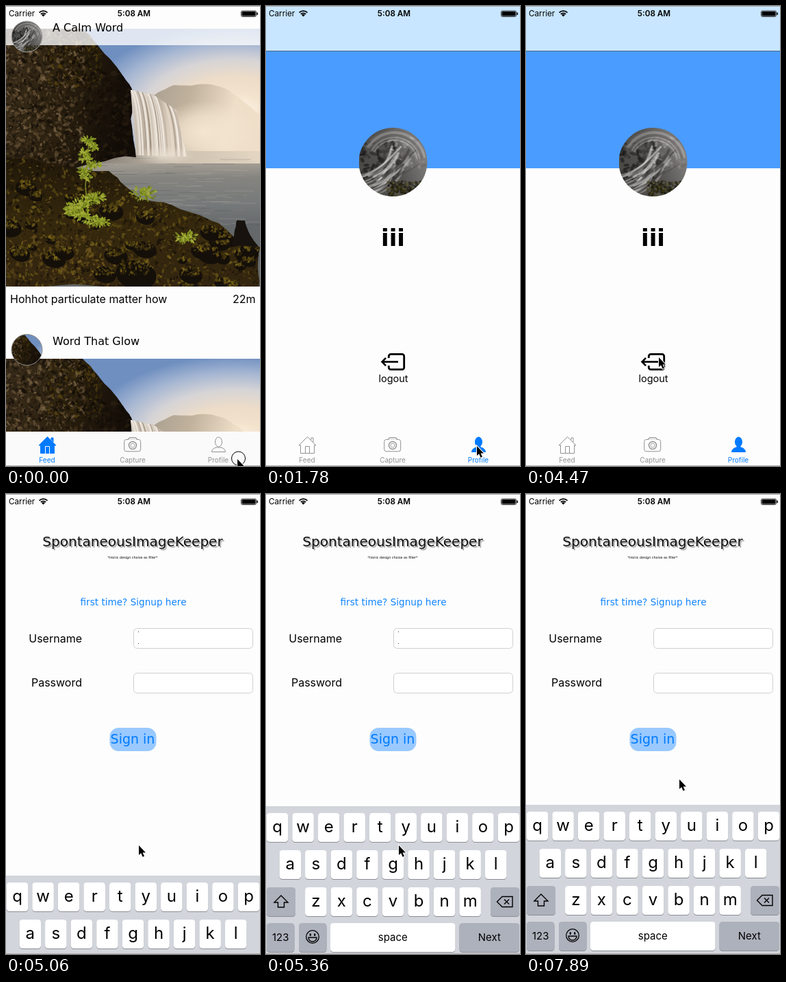
These frames come from a looping animation (371x669 px, 8000 ms). An HTML page with a canvas:

```html
<!DOCTYPE html>
<html lang="en">
<head>
<meta charset="utf-8">
<title>Photo feed</title>
<style>
html, body { margin: 0; width: 100%; height: 100%; overflow: hidden; background: #fdfdfd; }
canvas { display: block; width: 371px; height: 669px; }
</style>
</head>
<body>
<canvas id="stage"></canvas>
<script>
const W = 371, H = 669, LOOP = 8000, STEP = 148.9;
const SANS = 'Inter, "Open Sans", sans-serif';
const HAND = '"DejaVu Sans", cursive';
const BLUE = '#007aff', GREY = '#929292', PAPER = '#fdfdfd';
const ratio = window.devicePixelRatio || 1;

function makeContext(el, w, h) {
  el.width = Math.round(w * ratio);
  el.height = Math.round(h * ratio);
  const c = el.getContext('2d');
  c.scale(ratio, ratio);
  return c;
}
const g = makeContext(document.getElementById('stage'), W, H);

// ---- helpers ----
function rect(c, x, y, w, h, fill) {
  c.fillStyle = fill;
  c.fillRect(x, y, w, h);
}
function roundRect(x, y, w, h, r, fill, edge) {
  g.beginPath();
  g.roundRect(x, y, w, h, r);
  paint(fill, edge);
}
function paint(fill, edge, width = 1) {
  if (fill) {
    g.fillStyle = fill;
    g.fill();
  }
  if (edge) {
    g.strokeStyle = edge;
    g.lineWidth = width;
    g.stroke();
  }
}
function trace(c, pts) {
  c.beginPath();
  pts.forEach(([x, y]) => c.lineTo(x, y));
}
function line(pts, color, width) {
  trace(g, pts);
  paint(null, color, width);
}
function dot(c, x, y, rx, ry, turn, fill) {
  c.beginPath();
  c.ellipse(x, y, rx, ry, turn, 0, 7);
  c.fillStyle = fill;
  c.fill();
}
function ring(x, y, r, color, width) {
  g.beginPath();
  g.arc(x, y, r, 0, 7);
  paint(null, color, width);
}
function gradient(c, x0, y0, x1, y1, ...colors) {
  const grad = c.createLinearGradient(x0, y0, x1, y1);
  colors.forEach((col, i) => grad.addColorStop(i / (colors.length - 1), col));
  return grad;
}
function text(s, x, y, size, { color = '#000', align = 'left', weight = 400, font = SANS } = {}) {
  g.font = `${weight} ${size}px ${font}`;
  g.textAlign = align;
  g.fillStyle = color;
  g.fillText(s, x, y);
}
function hand(s, x, y, size, color = '#000', align = 'left') {
  text(s, x, y, size, { color, align, font: HAND });
}

// ---- pictures, painted once ----
let seed = 7;
const rnd = (a = 0, b = 1) => a + (b - a) * ((seed = (seed * 16807) % 2147483647) / 2147483647);
const pick = list => list[Math.floor(rnd(0, list.length))];

// Rough outline through a few key points.
function ragged(pts, depth = 3) {
  if (!depth) return pts;
  const out = [];
  pts.forEach(([x, y], i) => {
    out.push([x, y]);
    const next = pts[i + 1];
    if (!next) return;
    const d = Math.hypot(next[0] - x, next[1] - y) * 0.07;
    out.push([(x + next[0]) / 2 + rnd(-d, d), (y + next[1]) / 2 + rnd(-d, d)]);
  });
  return ragged(out, depth - 1);
}
function shape(c, pts, fill) {
  trace(c, pts);
  c.fillStyle = fill;
  c.fill();
}
function speckle(c, x, y, w, h, count, size, colors) {
  for (let i = 0; i < count; i++) {
    c.globalAlpha = rnd(0.35, 0.8);
    const r = size * rnd(0.4, 1.3);
    dot(c, x + rnd(0, w), y + rnd(0, h), r, r * rnd(0.3, 0.7), rnd(0, 3), pick(colors));
  }
  c.globalAlpha = 1;
}
function clipped(c, pts, body) {
  c.save();
  trace(c, pts);
  c.clip();
  body();
  c.restore();
}
function glow(c, x, y, rx, ry, ...colors) {
  c.save();
  c.translate(x, y);
  c.scale(1, ry / rx);
  const grad = c.createRadialGradient(0, 0, 0, 0, 0, rx);
  colors.forEach((col, i) => grad.addColorStop(i / (colors.length - 1), col));
  rect(c, -W, -W * 2, W * 2, W * 4, grad);
  c.restore();
}
function boulder(c, x, y, r) {
  dot(c, x, y, r, r * 0.7, 0.2, '#150f09');
  speckle(c, x - r * 0.8, y - r * 0.7, r * 1.5, r * 0.7, r * 3, 2.4, ['#6c5813', '#4f4010', '#84701d', '#2d220d']);
}
function plant(c, x, y, r) {
  for (let i = 0; i < r * 4; i++) {
    const a = rnd(0, 6.3), d = rnd(0, r);
    dot(c, x + Math.cos(a) * d, y + Math.sin(a) * d * 0.6, 2.6, 1.1, a, pick(['#8c9a25', '#6d7d1c', '#a4ab3a']));
  }
}
function paintLandscape() {
  const el = document.createElement('canvas');
  const c = makeContext(el, W, 375);

  glow(c, 335, 118, 225, 122, '#fff6e8', '#f3e3cd', '#ecdcc8', '#d6d4d6', '#a5b6d2', '#6f8fc0');
  shape(c, ragged([[195, 105], [245, 82], [318, 86], [371, 125], [371, 190], [195, 190]]),
    gradient(c, 200, 90, 330, 125, '#a69d90', '#c0b19c', '#efdfc9'));
  glow(c, 290, 150, 75, 45, '#f3e5d0', 'rgba(243,229,208,.7)', 'rgba(243,229,208,0)');

  rect(c, 0, 180, W, 195, gradient(c, 0, 180, 0, 290, '#bbb1a4', '#85847f', '#777a7a', '#64686a'));
  rect(c, 0, 178, W, 18, gradient(c, 120, 0, W, 0, '#77736c', '#cbbfae', '#e4d6c2'));
  for (let i = 0; i < 110; i++) {
    rect(c, rnd(80, 340), rnd(186, 285), rnd(10, 50), 1, pick(['rgba(190,184,174,.25)', 'rgba(50,55,60,.2)']));
  }

  const cliff = ragged([[-5, -5], [108, -5], [150, 42], [184, 88], [190, 187], [60, 210], [-5, 210]]);
  shape(c, cliff, gradient(c, 0, 0, 190, 40, '#382b1a', '#2c210f', '#120c07'));
  clipped(c, cliff, () => {
    speckle(c, 0, 0, 115, 205, 1500, 3.2, ['#5f4c30', '#110c07', '#231a0f', '#46361f', '#1a130b', '#80694a']);
    speckle(c, 60, 0, 80, 85, 450, 3, ['#5a4610', '#1b1308', '#372a0c', '#120d07']);
    speckle(c, 110, 60, 80, 130, 350, 4, ['#0e0a06', '#20170d', '#2d2213', '#140f08']);
  });

  const falls = [[182, 89], [215, 96], [248, 118], [264, 186], [190, 184]];
  shape(c, falls, gradient(c, 184, 0, 262, 0, '#d4cbc0', '#a3937f', '#d9ccbb', '#eadfcf'));
  clipped(c, falls, () => {
    for (let i = 0; i < 55; i++) {
      const u = rnd(), x = 180 + u * 68;
      c.beginPath();
      c.moveTo(x, 88 + u * u * 30);
      c.quadraticCurveTo(x + 12, 105 + u * 30, x + 14, 188);
      c.strokeStyle = pick(['rgba(250,244,236,.6)', 'rgba(240,232,222,.5)', 'rgba(120,104,86,.35)']);
      c.lineWidth = rnd(1, 3);
      c.stroke();
    }
  });
  glow(c, 232, 184, 45, 14, 'rgba(232,222,208,.9)', 'rgba(232,222,208,0)');

  const ground = ragged([[-5, 185], [90, 204], [150, 207], [190, 243], [285, 272], [371, 318], [371, 380], [-5, 380]]);
  shape(c, ground, gradient(c, 0, 190, 0, 375, '#211809', '#35280d', '#33250f'));
  clipped(c, ground, () => {
    speckle(c, 0, 185, W, 190, 2300, 3, ['#665314', '#130d07', '#7a651d', '#2b200c', '#473710', '#1a1209']);
    speckle(c, 0, 300, 170, 75, 350, 3, ['#7a5d20', '#5c471a', '#3a2b12']);
    for (let i = 0; i < 42; i++) {
      const x = rnd(0, W);
      boulder(c, x, 215 + x * 0.27 + rnd(0, 150 - x * 0.2), rnd(6, 19));
    }
  });
  boulder(c, 190, 358, 30);
  shape(c, ragged([[331, 315], [337, 279], [349, 279], [369, 317]]), '#17120e');

  c.strokeStyle = '#7c872a';
  c.lineWidth = 1.5;
  trace(c, [[122, 290], [116, 230], [121, 165]]);
  c.stroke();
  for (let i = 0; i < 7; i++) plant(c, 120 + Math.sin(i * 2) * 9, 162 + i * 9, 10);
  for (let i = 0; i < 8; i++) plant(c, 95 + i * 6, 262 + Math.sin(i * 3) * 22, 15);
  plant(c, 200, 240, 19);
  plant(c, 263, 303, 17);
  return el;
}
function paintFalls() {
  const el = document.createElement('canvas');
  const c = makeContext(el, 100, 100);
  rect(c, 0, 0, 100, 100, gradient(c, 0, 60, 100, 20, '#4a4946', '#555452', '#8b8987'));
  speckle(c, 0, 20, 60, 55, 130, 5, ['#1c1b1a', '#343331', '#504f4d']);
  speckle(c, 45, 15, 50, 45, 60, 5, ['#a3a19f', '#6f6d6b', '#858381']);
  c.lineCap = 'round';
  for (let i = 0; i < 24; i++) {
    const y = rnd(70, 100), x = rnd(0, 35);
    c.beginPath();
    c.moveTo(x, y);
    c.quadraticCurveTo(x + 25, y - 8, x + rnd(30, 60), y - rnd(25, 45));
    c.strokeStyle = pick(['rgba(235,234,232,.55)', 'rgba(190,188,186,.5)', 'rgba(60,59,57,.6)']);
    c.lineWidth = rnd(1, 4);
    c.stroke();
  }
  for (let i = 0; i < 8; i++) {
    c.beginPath();
    c.arc(52, 52, 34 + i * 2, -2.6, -0.2);
    c.strokeStyle = pick(['rgba(215,213,211,.35)', 'rgba(110,108,106,.4)']);
    c.lineWidth = 2;
    c.stroke();
  }
  speckle(c, 42, 78, 50, 22, 230, 2.5, ['#5f5716', '#141209', '#2a260f', '#1c1a10']);
  return el;
}
const landscape = paintLandscape();
const falls = paintFalls();

function avatar(img, x, y, r, sx, sy, size, border) {
  g.save();
  g.beginPath();
  g.arc(x, y, r, 0, 7);
  g.clip();
  g.drawImage(img, sx * ratio, sy * ratio, size * ratio, size * ratio, x - r, y - r, r * 2, r * 2);
  g.restore();
  if (border) ring(x, y, r, border, 1);
}

// ---- shared chrome ----
function statusBar() {
  text('Carrier', 4, 15, 11.7);
  text('5:08 AM', 187, 15, 11.7, { align: 'center', weight: 600 });
  for (let i = 0; i < 3; i++) {
    g.beginPath();
    g.arc(54.5, 15.5, 2 + i * 3.2, -Math.PI * 0.75, -Math.PI * 0.25);
    paint(null, '#000', i ? 1.7 : 3);
  }
  roundRect(343.5, 7, 22, 8.5, 2, null, '#333');
  roundRect(344.5, 8, 20, 6.5, 1, '#000');
  rect(g, 366.5, 9.5, 1.5, 3.5, '#000');
}
function house(on) {
  const fill = on ? BLUE : null, color = on ? BLUE : GREY;
  trace(g, [[66, 631], [66, 628], [69, 628], [69, 634]]);
  paint(fill, color);
  trace(g, [[48, 639], [60.5, 626.5], [73, 639]]);
  g.closePath();
  paint(on ? BLUE : '#fff', color);
  g.beginPath();
  g.rect(50.5, 639, 20, 11.5);
  paint(on ? BLUE : '#fff', color);
  if (!on) rect(g, 51, 638, 19, 2, '#fff');
  line([[57.5, 651], [57.5, 640.5], [63.5, 640.5], [63.5, 651]], on ? '#fff' : color, 1);
}
function camera() {
  roundRect(172.7, 630.5, 24, 17.3, 3, null, GREY);
  trace(g, [[178, 630.7], [180.5, 627.8], [189.5, 627.8], [192, 630.7]]);
  paint('#fafafa', GREY, 1.2);
  ring(185, 639, 5.5, GREY, 1.4);
  ring(185, 639, 3, GREY, 0.8);
}
function person(on) {
  const fill = on ? BLUE : '#fafafa', edge = on ? BLUE : GREY;
  g.beginPath();
  g.moveTo(300.5, 648.5);
  g.quadraticCurveTo(301, 643.5, 307, 642);
  g.lineTo(314, 642);
  g.quadraticCurveTo(320, 643.5, 320.5, 648.5);
  g.closePath();
  paint(fill, edge);
  if (on) rect(g, 307.5, 636, 6, 8, BLUE);
  g.beginPath();
  g.ellipse(310.5, 634, 5, 7, 0, 0, 7);
  paint(fill, edge);
}
function tabBar(active) {
  rect(g, 0, 619, W, 50, active ? PAPER : '#fafafa');
  house(active === 0);
  camera();
  person(active === 2);
  ['Feed', 'Capture', 'Profile'].forEach((s, i) =>
    text(s, 60 + i * 125, 664, 10, { align: 'center', color: i === active ? BLUE : GREY }));
}

// ---- screens ----
function feed() {
  g.drawImage(landscape, 0, 33, W, 375);
  g.drawImage(landscape, 0, 513, W, 375);
  rect(g, 0, 33, W, 24, 'rgba(255,255,255,.78)');
  avatar(falls, 30.5, 44.5, 22.5, 0, 0, 100, '#aaa');
  hand('A Calm Word', 68, 37, 16);
  text('Hohhot particulate matter how', 6, 432, 16);
  text('22m', 364.5, 432, 16, { align: 'right' });
  avatar(landscape, 30.5, 500, 22.5, 85, 10, 90, '#888');
  hand('Word That Glow', 68, 493, 16);
  tabBar(0);
}
function profile() {
  rect(g, 0, 0, W, 65, '#c8e6ff');
  rect(g, 0, 65, W, 1, '#4c6b88');
  rect(g, 0, 66, W, 170, '#4a9cff');
  avatar(falls, 185.5, 227, 50, 0, 0, 100);
  text('iii', 185.5, 349, 34, { align: 'center', weight: 700, font: HAND });

  roundRect(179.3, 506.3, 22.4, 22.4, 3);
  paint(null, '#000', 2.8);
  rect(g, 177, 512, 4, 11, PAPER);
  line([[193, 517.5], [169.5, 517.5]], '#000', 2.6);
  line([[175, 511.8], [169.5, 517.5], [175, 523.2]], '#000', 2.6);
  text('logout', 186, 547, 14.5, { align: 'center' });
  tabBar(2);
}
function login(k) {
  const title = 'SpontaneousImageKeeper';
  hand(title, 187, 77.5, 20, '#aaa', 'center');
  hand(title, 185, 75.5, 20, '#111', 'center');
  hand('*Ironic design choise as filler*', 185, 94, 4.9, '#000', 'center');
  hand('first time? Signup here', 186, 162, 13.6, '#1184ff', 'center');
  ['Username', 'Password'].forEach((s, i) => {
    text(s, 111, 216 + i * 64, 16, { align: 'right' });
    roundRect(186.5, 195.5 + i * 65, 174, 29, 5, '#fff', '#cfcfcf');
  });
  if (k < 51) {
    rect(g, 193, 200, 1, 1, '#333');
    rect(g, 193, 217, 1, 1, '#333');
  }
  roundRect(151.5, 340, 68, 34, 13, '#99c9ff');
  hand('Sign in', 185, 363, 19, BLUE, 'center');
  keyboard(Math.round(452 + 103 * Math.pow(0.14, k - 34)));
}
function keyCap(x, y, w, dark) {
  roundRect(x, y + 1, w, 42, 4.5, '#8b8e94');
  roundRect(x, y, w, 42, 4.5, dark ? '#adb1bc' : '#fff');
}
function keyboard(y) {
  const pitch = 37.55, key = 31.5, third = y + 118, last = y + 170;
  rect(g, 0, y, W, H - y, '#d2d5db');
  ['qwertyuiop', 'asdfghjkl', 'zxcvbnm'].forEach((row, r) => {
    const x0 = (W - row.length * pitch + pitch - key) / 2;
    [...row].forEach((ch, i) => {
      const x = x0 + i * pitch, top = y + 10 + r * 54;
      keyCap(x, top, key);
      text(ch, x + key / 2, top + 28, 24, { align: 'center' });
    });
  });
  const wide = (x, top, w, label, light) => {
    keyCap(x, top, w, !light);
    text(label, x + w / 2, top + 26, 15, { align: 'center' });
  };
  wide(1, third, 42, '');
  wide(328, third, 42, '');
  wide(1, last, 40.5, '123');
  wide(48, last, 40.5, '');
  wide(94, last, 182.5, 'space', true);
  wide(282.5, last, 87.5, 'Next');

  g.save();
  g.translate(22, third + 21);
  trace(g, [[0, -9], [10, 1], [4.5, 1], [4.5, 8], [-4.5, 8], [-4.5, 1], [-10, 1]]);
  g.closePath();
  paint(null, '#000', 1.4);
  g.translate(327, 0);
  trace(g, [[-11.5, 0], [-4, -7.5], [11, -7.5], [11, 7.5], [-4, 7.5]]);
  g.closePath();
  paint(null, '#000', 1.4);
  for (const s of [-1, 1]) line([[-1, -3.5 * s], [6, 3.5 * s]], '#000', 1.4);
  g.restore();

  const cx = 68, cy = last + 20;
  ring(cx, cy, 9.3, '#000', 1.3);
  for (const s of [-1, 1]) dot(g, cx + s * 3.2, cy - 3, 1.3, 2, 0, '#000');
  g.beginPath();
  g.arc(cx, cy + 1, 6, 0, Math.PI);
  g.closePath();
  paint(null, '#000', 1.3);
}

// ---- pointer: step, x, y ----
const PATH = [
  [2, 338, 659], [8, 308, 640], [16, 308, 640], [20, 176, 530], [22, 194, 511],
  [36, 194, 511], [41, 206, 286], [46, 206, 209], [50, 206, 209], [53, 224, 415]
];
const CLICKS = [0, 11, 29, 47];

function pointerAt(k) {
  const i = PATH.findIndex(p => p[0] >= k);
  if (i < 1) return PATH[0].slice(1);
  const [k0, x0, y0] = PATH[i - 1], [k1, x1, y1] = PATH[i];
  const u = (k - k0) / (k1 - k0), e = u * u * (3 - 2 * u);
  return [Math.round(x0 + (x1 - x0) * e), Math.round(y0 + (y1 - y0) * e)];
}
function pointer(k) {
  const [x, y] = pointerAt(k);
  if (CLICKS.includes(k)) ring(x + 1.5, y - 1, 10, '#000', 1);
  g.save();
  g.translate(x, y);
  trace(g, [[0, 0], [0, 14], [3.2, 11.2], [5.6, 16.8], [8, 15.8], [5.6, 10.4], [10, 10.4]]);
  g.closePath();
  paint(null, '#fff', 2);
  paint('#000');
  g.restore();
}

function draw(now) {
  const k = Math.min(53, Math.floor((now % LOOP) / STEP + 0.08));
  rect(g, 0, 0, W, H, PAPER);
  if (k < 12) feed();
  else if (k < 34) profile();
  else login(k);
  statusBar();
  rect(g, 0, 0, W, 1, '#aaa');
  rect(g, 0, 668, W, 1, '#b5b3ae');
  pointer(k);
}

const start = performance.now();
function tick() {
  draw(performance.now() - start);
  requestAnimationFrame(tick);
}
tick();
</script>
</body>
</html>
```
